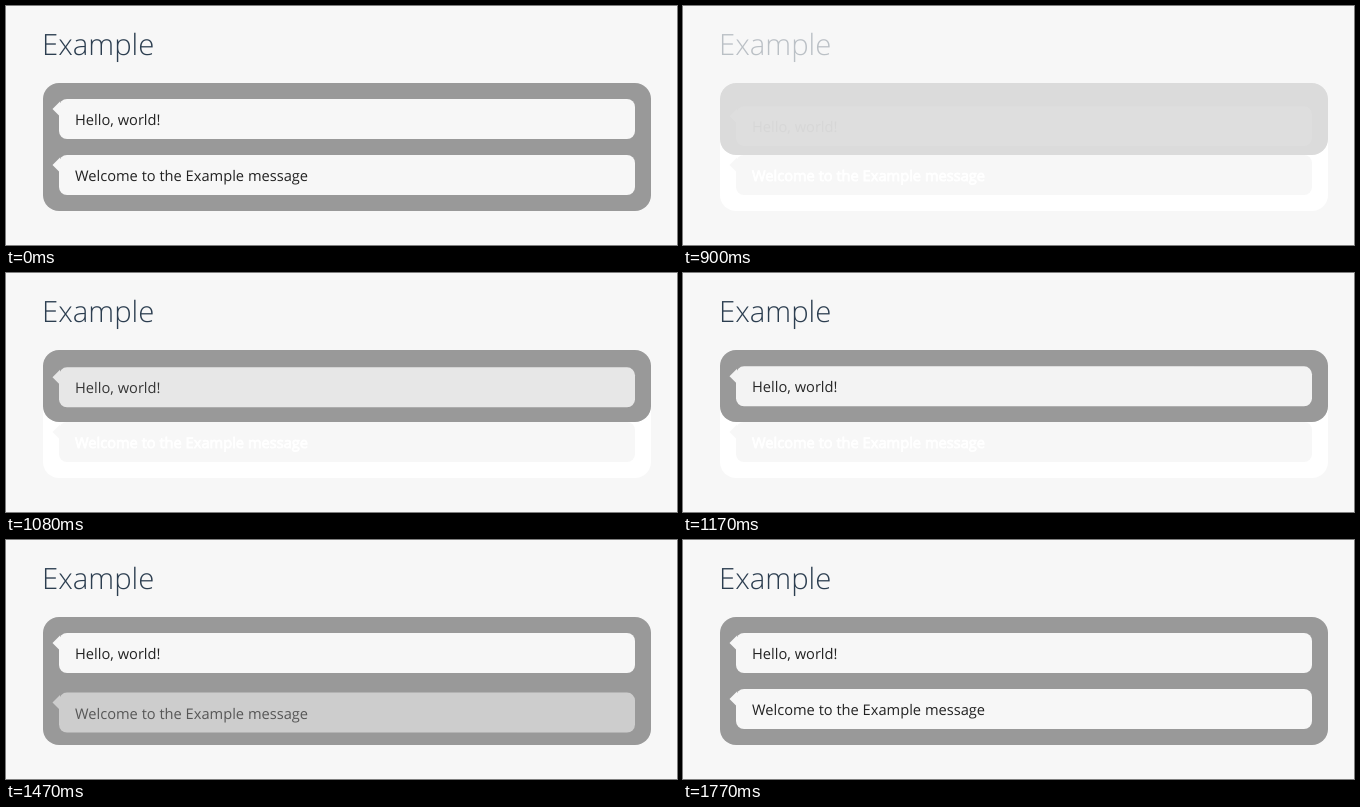
An HTML page for the animation above (2.52 s loop, 671 by 239 pixels).

```html
<!DOCTYPE html>
<html lang="en">
<head>
<meta charset="utf-8">
<title>Example</title>
<style>
  html, body { margin: 0; width: 100%; height: 100%; overflow: hidden; background: #f7f7f7; }
  svg { display: block; width: 671px; height: 239px; }
  text { font-family: "Open Sans", "Noto Sans", sans-serif; text-rendering: geometricPrecision; }
  .title { font-size: 29.3px; font-weight: 300; fill: #2c3e50; }
  .label { font-size: 14.65px; fill: #222; }
  .bubble { fill: #f7f7f7; }
  .panel { fill: #999; }
  .blank .panel { fill: #fff; }
  .blank text { fill: #fff; stroke: #fff; stroke-width: .8px; }
</style>
</head>
<body>
<svg viewBox="0 0 671 239">
  <defs>
    <text id="title" class="title" x="36" y="49">Example</text>
    <g id="bubble" class="bubble">
      <rect x="53" width="576" height="40" rx="8"/>
      <path d="M46.5 10 L54 2.5 V17.5 Z"/>
    </g>
    <g id="first">
      <use href="#bubble"/>
      <text class="label" x="69" y="26">Hello, world!</text>
    </g>
    <g id="second">
      <use href="#bubble"/>
      <text class="label" x="69" y="26">Welcome to the Example message</text>
    </g>
  </defs>

  <g id="blank" class="blank">
    <text id="blankTitle" class="title" x="36" y="49">Example</text>
    <rect class="panel" x="37" y="77" width="608" height="128" rx="16"/>
    <g transform="translate(0 93)">
      <use href="#bubble"/>
      <text class="label" x="69" y="26">Hello, world!</text>
    </g>
    <g transform="translate(0 149)">
      <use href="#bubble"/>
      <text class="label" x="69" y="26">Welcome to the Example message</text>
    </g>
  </g>

  <rect id="backing" x="37" y="77" width="608" height="72" rx="16" fill="#f7f7f7"/>
  <g id="page">
    <use href="#title"/>
    <rect id="panel" class="panel" x="37" y="77" width="608" height="128" rx="16"/>
    <use id="msg1" href="#first"/>
    <use id="msg2" href="#second"/>
  </g>
</svg>
<script>
  const LOOP = 2520, STEP = 30;
  const CLEAR = 810, SHOW = 870, GROW = 1350;
  const FADE = 225, ENTER = 420, LEAD = 15, RISE = 8;
  const $ = id => document.getElementById(id);
  const bezier = (a, b, s) => 3 * a * s * (1 - s) ** 2 + 3 * b * s * s * (1 - s) + s ** 3;

  // CSS "ease": cubic-bezier(.25, .1, .25, 1)
  function ease(x) {
    if (x <= 0) return 0;
    if (x >= 1) return 1;
    let lo = 0, hi = 1;
    for (let i = 0; i < 24; i++) {
      const mid = (lo + hi) / 2;
      if (bezier(.25, .25, mid) < x) lo = mid; else hi = mid;
    }
    return bezier(.1, 1, lo);
  }

  const progress = (t, start, length) => ease((t - start + LEAD) / length);
  const show = (id, on) => $(id).setAttribute("visibility", on ? "visible" : "hidden");

  function place(id, y, p) {
    $(id).setAttribute("transform", `translate(0 ${y + RISE * (1 - p)})`);
    $(id).setAttribute("opacity", p);
  }

  function draw(now) {
    const t = Math.floor((now % LOOP) / STEP) * STEP;
    const full = t < CLEAR;
    const short = t >= SHOW && t < GROW;

    show("blank", t >= CLEAR && t < GROW);
    show("blankTitle", t >= CLEAR && t < SHOW);
    show("backing", short);
    show("page", full || t >= SHOW);

    $("panel").setAttribute("height", short ? 72 : 128);
    $("page").setAttribute("opacity", full ? 1 : progress(t, SHOW, FADE));
    place("msg1", 93, full ? 1 : progress(t, SHOW, ENTER));
    place("msg2", 149, full ? 1 : t < GROW ? 0 : progress(t, GROW, ENTER));
  }

  function tick() {
    draw(performance.now());
    requestAnimationFrame(tick);
  }
  tick();
</script>
</body>
</html>
```
